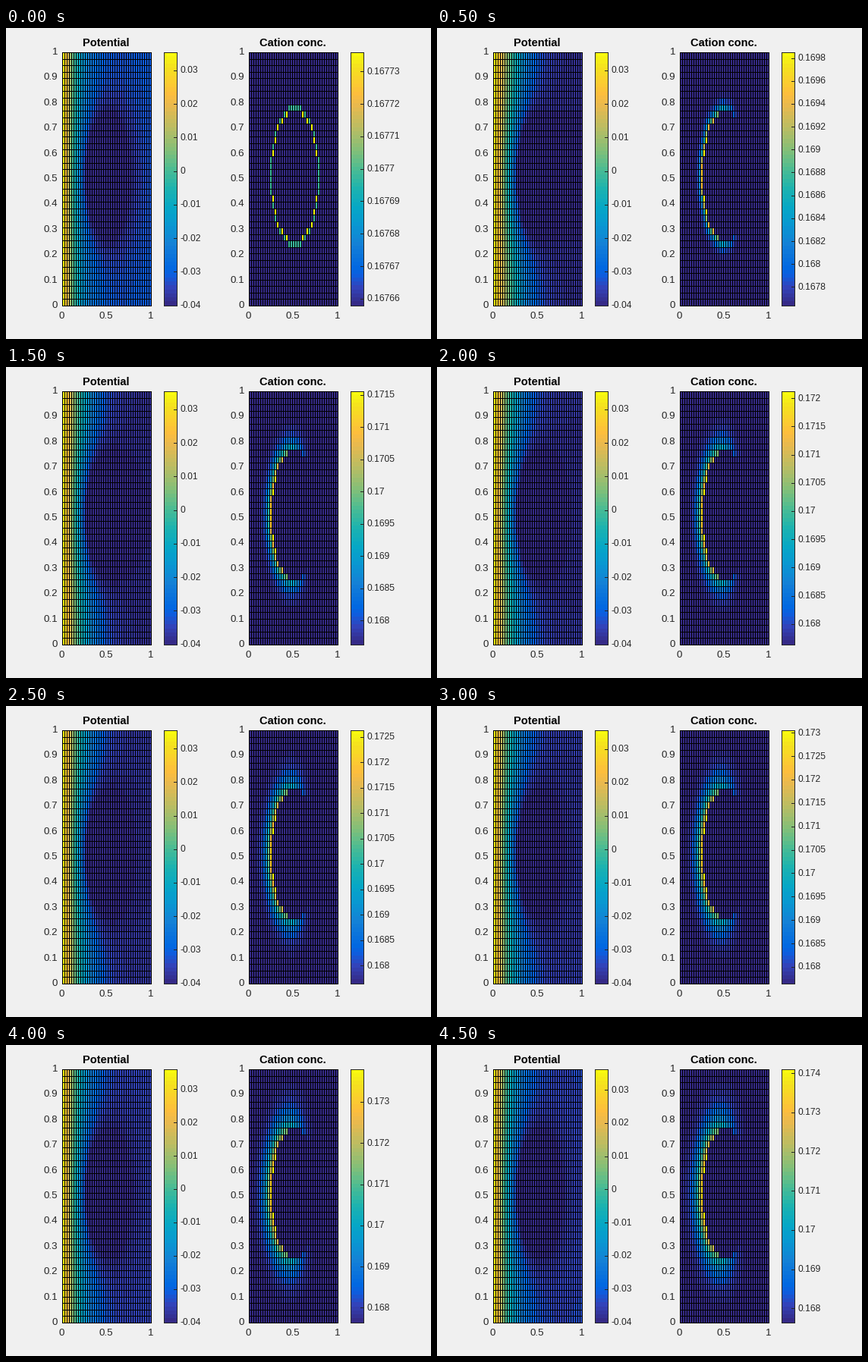
A matplotlib script that plays this animation: 560x410 px, repeating every 5000 ms.

```python
import numpy as np
import matplotlib.pyplot as plt
from matplotlib.animation import FuncAnimation
from matplotlib.colors import LinearSegmentedColormap

W, H, DPI = 560, 410, 80
PX = 72 / DPI
FRAMES, INTERVAL = 10, 500
N = 40                        # grid nodes per side
TOP, BOTTOM = 31.5, 365.5
SPAN = BOTTOM - TOP
INK = "#262626"

plt.rcParams["font.family"] = "Liberation Sans"

STOPS = [
    (0, .2081, .1663, .5292), (4, .1959, .2645, .7279), (7, .0591, .3598, .8683),
    (9, .0060, .4086, .8828), (15, .0779, .5040, .8384), (20, .0343, .5966, .8199),
    (24, .0228, .6535, .7768), (29, .1133, .7015, .6859), (34, .3022, .7376, .5712),
    (38, .4871, .7491, .4840), (44, .7184, .7411, .3905), (50, .9139, .7258, .3063),
    (53, .9938, .7455, .2403), (57, .9789, .8271, .1633), (60, .9589, .8949, .1129),
    (63, .9763, .9831, .0538),
]
CMAP = LinearSegmentedColormap.from_list(
    "warmcool", [(s[0] / 63, s[1:]) for s in STOPS], N=64)

# Colour limits and tick steps per frame
CAT_LO = [.167658, .167641, .167637, .16763, .16764,
          .16765, .16765, .16766, .16765, .16765]
CAT_HI = [.167736, .169853, .17083, .17156, .17213,
          .17264, .17306, .17345, .17380, .17411]
CAT_STEP = [1e-5, 2e-4] + [5e-4] * 6 + [1e-3] * 2
POT_LO = -.04
POT_HI = [.0355, .0355, .0355, .0355, .0355, .0356, .0357, .0359, .0361, .0363]

row, col = np.mgrid[:N, :N]
dx, dy = col - 19.5, row - 19.5
radius = np.hypot(dx, dy)
inside = radius <= 10
SHIFTS = [(0, 1), (0, -1), (1, 0), (-1, 0)]


def shifted(a, dr, dc):
    """Value of the neighbour at (dr, dc), edges repeated."""
    p = np.pad(a, 1, mode="edge")
    return p[1 + dr:1 + dr + N, 1 + dc:1 + dc + N]


def potential(n):
    """Screened Poisson field around a disc held at the lowest value."""
    if n == 0:
        rest, kappa2 = -.030, 40
    else:
        s = (n - 1) / 8
        rest, kappa2 = -.0395 + .007 * s, 4 + 21 * s
    k = kappa2 / (N - 1) ** 2
    A = np.zeros((N * N, N * N))
    b = np.zeros(N * N)
    for r in range(N):
        for c in range(N):
            i = r * N + c
            if c == 0 or inside[r, c]:
                A[i, i] = 1
                b[i] = POT_HI[n] if c == 0 else POT_LO
                continue
            A[i, i] = 4 + k
            b[i] = k * rest
            for dr, dc in SHIFTS:
                rr = min(max(r + dr, 0), N - 1)
                cc = min(max(c + dc, 0), N - 1)
                A[i, rr * N + cc] -= 1
    return np.linalg.solve(A, b).reshape(N, N)


def cations():
    """Ions fed in at the disc's rim, spreading outwards; scaled to 0..1."""
    out = ~inside
    faces = [out & shifted(inside, *s) for s in SHIFTS]
    count = sum(f.astype(float) for f in faces)
    gain = np.clip((-dx / radius + .55) / 1.55, 0, None)
    source = gain * sum(f * np.abs(dx if dc else dy) / radius
                        for f, (dr, dc) in zip(faces, SHIFTS))
    fields = [count / 2]
    u, dt = np.zeros((N, N)), .05
    links = [out & shifted(out, *s) for s in SHIFTS]
    for n in range(1, FRAMES):
        for _ in range(round(1 / dt)):
            flow = sum(l * (shifted(u, *s) - u) for l, s in zip(links, SHIFTS))
            u = u + dt * (flow + source)
        fields.append(u / u.max())
    return fields


POT = [potential(n) for n in range(FRAMES)]
CAT = cations()

fig = plt.figure(figsize=(W / DPI, H / DPI), dpi=DPI, facecolor="#f0f0f0")
ax = fig.add_axes([0, 0, 1, 1])
ax.set_xlim(0, W)
ax.set_ylim(H, 0)
ax.axis("off")


def label(x, y, s, size, **kw):
    kw = {"color": INK, "va": "center", **kw}
    return ax.text(x, y, s, fontsize=size * PX, **kw)


def frame(x0, x1, color):
    ax.plot([x0, x1, x1, x0, x0], [TOP, TOP, BOTTOM, BOTTOM, TOP],
            color=color, lw=PX, antialiased=False, zorder=4)


class Panel:
    def __init__(self, x0, title):
        x1 = x0 + 117
        xs = x0 + 3 * np.arange(N)
        ys = np.round(365 - 334 * np.arange(N) / (N - 1)) + .5
        self.mesh = ax.pcolormesh(xs, ys, np.zeros((N - 1, N - 1)), cmap=CMAP,
                                  vmin=0, vmax=1, antialiased=False)
        grid = dict(colors="black", lw=PX, antialiased=False, zorder=3)
        ax.vlines(xs, TOP, BOTTOM, **grid)
        ax.hlines(ys, x0, x1, **grid)
        frame(x0, x1, "black")

        label((x0 + x1) / 2, 24, title, 14.67, color="black", weight="bold",
              ha="center", va="baseline")
        for i in range(11):
            label(x0 - 5.5, BOTTOM + .5 - SPAN * i / 10, f"{i / 10:g}", 13.33, ha="right")
        for v in (0, .5, 1):
            label(x0 + 117 * v, 380, f"{v:g}", 13.33, ha="center")

        self.bar0, self.bar1 = x0 + 134, x0 + 151
        ax.pcolormesh([self.bar0, self.bar1], np.linspace(BOTTOM, TOP, 65),
                      np.arange(64)[:, None], cmap=CMAP, antialiased=False)
        frame(self.bar0, self.bar1, INK)
        self.texts = [label(self.bar1 + 5.5, 0, "", 12, ha="left") for _ in range(13)]
        self.ticks = ax.vlines([], 0, 0, colors=INK, lw=PX,
                               antialiased=False, zorder=5)
        ax.set_xlim(0, W)
        ax.set_ylim(H, 0)

    def update(self, level, lo, hi, step):
        self.mesh.set_array(level[:-1, :-1])
        first = int(np.ceil(lo / step - 1e-6))
        last = int(np.floor(hi / step + 1e-6))
        values = [k * step for k in range(first, last + 1)]
        ys = [BOTTOM - SPAN * (v - lo) / (hi - lo) for v in values]
        self.ticks.set_segments([[(self.bar1 - 3.5, y), (self.bar1, y)] for y in ys])
        for t in self.texts:
            t.set_text("")
        for t, v, y in zip(self.texts, values, ys):
            t.set_text(f"{v:.6g}")
            t.set_y(y + .5)


left = Panel(73.5, "Potential")
right = Panel(319.5, "Cation conc.")


def draw(n):
    hi = POT_HI[n]
    left.update((POT[n] - POT_LO) / (hi - POT_LO), POT_LO, hi, .01)
    right.update(CAT[n], CAT_LO[n], CAT_HI[n], CAT_STEP[n])
    return []


anim = FuncAnimation(fig, draw, frames=FRAMES, init_func=lambda: draw(0),
                     interval=INTERVAL, repeat=True, repeat_delay=0, blit=False)
plt.show()
```
